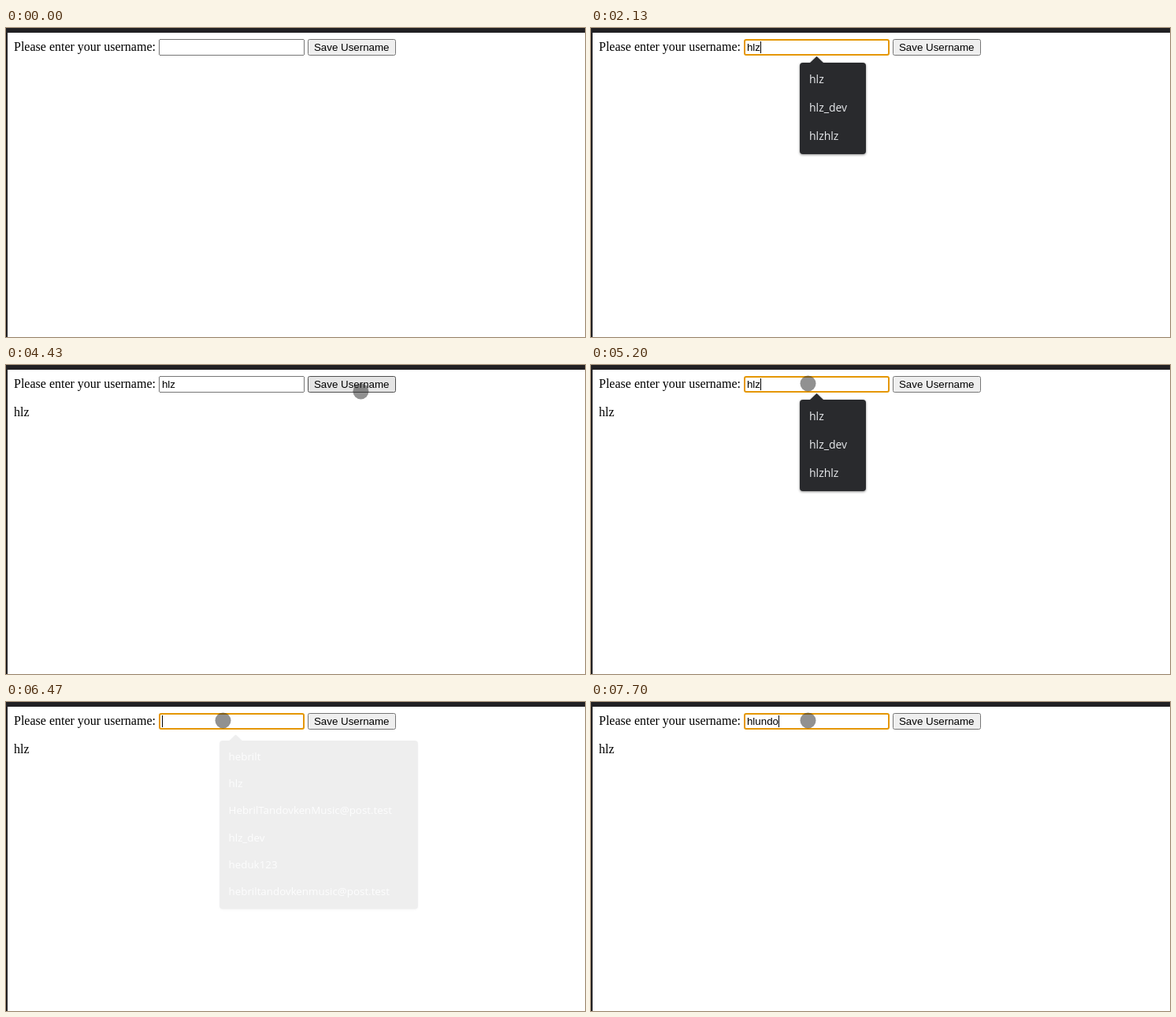
An HTML page for the animation above (8000 ms loop, 735x392 px).

```html
<!DOCTYPE html>
<html lang="en">
<head>
<meta charset="utf-8">
<title>Save username</title>
<style>
  html, body { margin: 0; width: 100%; height: 100%; overflow: hidden; background: #fff; }
  body { pointer-events: none; font: 16px "Liberation Serif", "Times New Roman", serif; }
  body > * { position: absolute; }
  #frame { inset: 0; border: solid #212023; border-width: 6px 0 0 2px; }
  #page { left: 10px; top: 14px; white-space: nowrap; color: #000; }
  input, button { margin: 0; font: 13.333px "Liberation Sans", Arial, sans-serif; color: #000; }
  input { box-sizing: border-box; width: 185px; height: 21px; }
  input.focus { border: 2px solid #e59700; border-radius: 3px; background: #fff; }
  button.hover, button.active { border: 1px solid #4f4f4f; border-radius: 2.5px; padding: 2px 7px; background: #e5e5e5; }
  button.active { border-color: #8d8d8d; background: #f5f5f5; }
  p { margin: 16px 0; }
  #caret { top: 17px; width: 1px; height: 15px; background: #000; }
  #cursor { left: -10px; top: -10px; width: 20px; height: 20px; border-radius: 50%; background: #282828; }
  #popup { left: 265px; top: 36px; padding-top: 8px; filter: drop-shadow(0 1px 1.5px rgba(0, 0, 0, .45)); }
  #popup::before { content: ""; position: absolute; left: 12px; top: 0; width: 19px; height: 9px;
    background: #292a2d; clip-path: polygon(0 100%, 50% 0, 100% 100%); }
  #rows { box-sizing: border-box; padding: 4px 12px; border-radius: 4px; background: #292a2d; }
  #rows div { height: 36px; font: 14px/34px "Open Sans", "Noto Sans", sans-serif; color: #e8eaed; white-space: nowrap; }
</style>
</head>
<body>
<div id="frame"></div>
<div id="page">Please enter your username: <input id="field" readonly tabindex="-1"> <button id="save" tabindex="-1">Save Username</button><p id="saved">hlz</p></div>
<div id="caret"></div>
<div id="cursor"></div>
<div id="popup"><div id="rows"></div></div>
<script>
const LOOP = 8000;
const [field, save, saved, caret, cursor, popup, rows] =
  ['field', 'save', 'saved', 'caret', 'cursor', 'popup', 'rows'].map(id => document.getElementById(id));
const pen = document.createElement('canvas').getContext('2d');
pen.font = '13.333px "Liberation Sans", Arial, sans-serif';

const names = ['rmpk_hebril', 'hebrilt', 'hlz', 'HebrilTandovkenMusic@post.test', 'hlz_dev',
  'heduk123', 'hebriltandovkenmusic@post.test', 'hlzhlz', 'hlundo'];

// When the caret starts a fresh blink
const edits = [900, 1800, 2130, 5200, 6000, 6500, 7000, 7500];

const moves = [
  { at: 230, time: 370, from: [289.5, -10], to: [287.5, 28.5] },
  { at: 930, time: 130, from: [287.5, 28.5], to: [655, 110] },
  { at: 3070, time: 400, from: [618.5, 109.5], to: [452.5, 33.5] },
  { at: 4430, time: 170, from: [452.5, 33.5], to: [275.5, 23.5] }
];

const clamp = k => Math.min(1, Math.max(0, k));
const during = (t, a, b) => t >= a && t < b;
const last = (list, test) => list.filter(test).pop();

function typedText(t) {
  const keys = (start, gap) => Math.max(0, Math.floor((t - start) / gap) + 1);
  if (t < 6000) return 'hlz'.slice(0, keys(1800, 165));
  if (t < 7000) return 'hlz'.slice(0, Math.max(0, 3 - keys(6000, 170)));
  return 'hlundo'.slice(0, keys(7000, 106));
}

// Linear opening, quadratic closing
function popupAlpha(t) {
  const shown = (open, rise, close) =>
    clamp((t - open) / rise) * (1 - clamp((t - close) / 180)) ** 2;
  return Math.max(shown(900, 170, 3758), shown(5199, 1, 6340), shown(7000, 130, 7520));
}

let listed = null;
function fillPopup(query) {
  if (query === listed) return;
  listed = query;
  const list = names.filter(n => n.toLowerCase().startsWith(query)).slice(0, 6);
  rows.style.width = (list.some(n => n.includes('@')) ? 264 : 84) + 'px';
  rows.innerHTML = list.map(n => `<div>${n}</div>`).join('');
}

function drawPopup(t, text) {
  const a = popupAlpha(t);
  fillPopup(during(t, 6340, 7000) ? 'h' : text);
  popup.style.opacity = a;
  popup.style.transform = a < 1 ? `scale(${.95 + .05 * a})` : 'none';
}

function drawField(t, text) {
  const focus = during(t, 900, 3800) || t >= 5200;
  const blink = t - (last(edits, e => e <= t) || 0);
  field.className = focus ? 'focus' : '';
  if (field.value !== text) field.value = text;
  caret.style.left = Math.floor(198 + pen.measureText(text).width) + 'px';
  caret.style.opacity = focus && blink % 1000 < 500 ? 1 : 0;
}

function drawCursor(t) {
  const move = last(moves, m => m.at <= t) || moves[0];
  const k = 1 - (1 - clamp((t - move.at) / move.time)) ** 2;
  const [x, y] = move.from.map((v, i) => v + (move.to[i] - v) * k);
  const visible = during(t, 230, 1060) || t >= 3070;
  const pressed = [900, 3800, 4900].some(tap => during(t, tap, tap + 60));
  cursor.style.transform = `translate(${x}px, ${y}px)`;
  cursor.style.opacity = visible ? (pressed ? .56 : .51) : 0;
}

function draw(t) {
  const text = typedText(t);
  drawField(t, text);
  drawCursor(t);
  drawPopup(t, text);
  save.className = during(t, 3800, 3870) ? 'active' : during(t, 3870, 5200) ? 'hover' : '';
  saved.style.opacity = t >= 3800 ? 1 : 0;
}

const start = performance.now();
function tick() {
  draw((performance.now() - start) % LOOP);
  requestAnimationFrame(tick);
}
tick();
</script>
</body>
</html>
```
